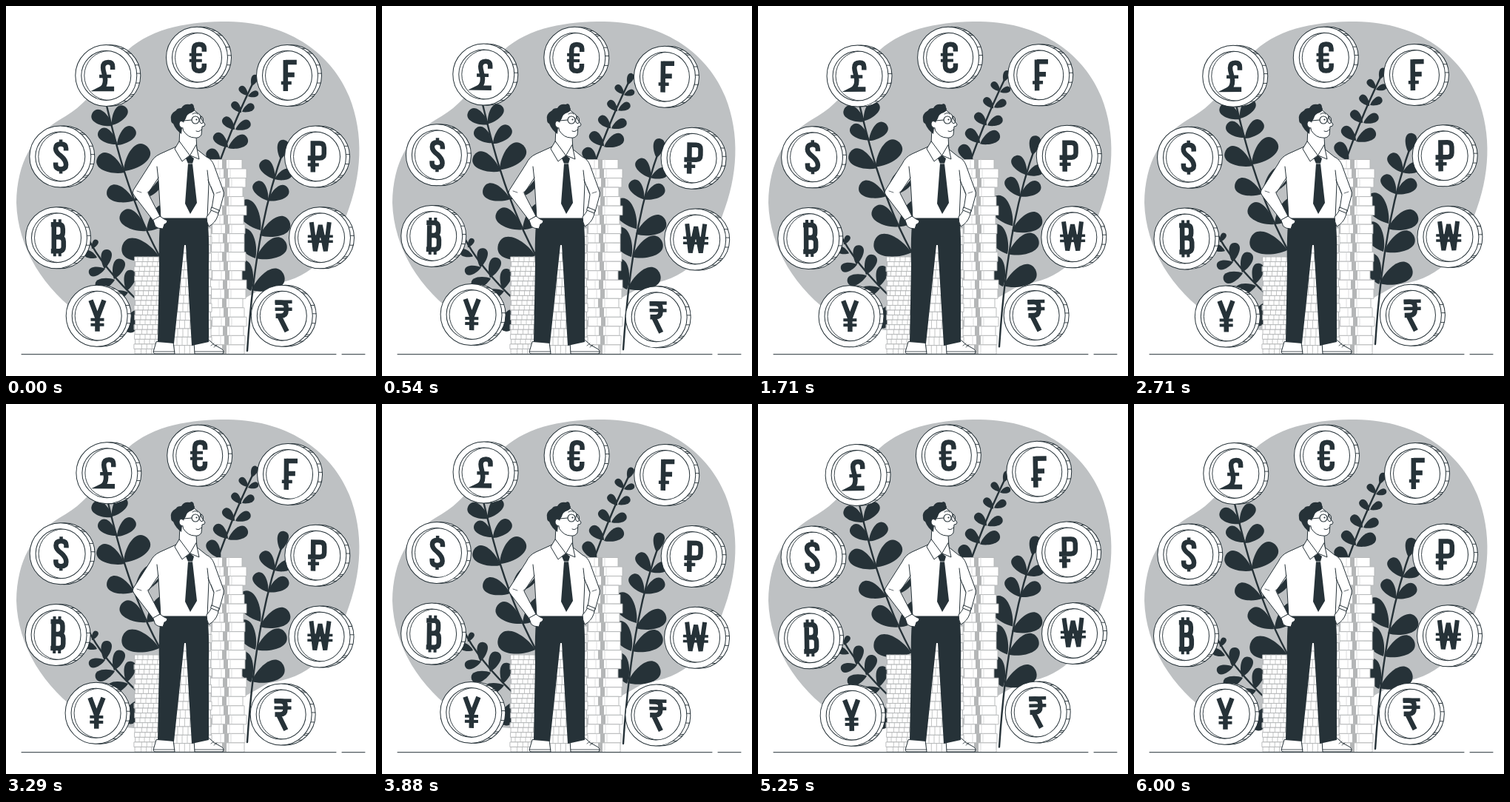
Animation, 500 px wide and 500 px high, one loop 6040 ms. Source, as an HTML page with a canvas:

```html
<!DOCTYPE html>
<html lang="en">
<head>
<meta charset="utf-8">
<title>Currencies</title>
<style>
html, body { margin: 0; width: 100%; height: 100%; overflow: hidden; background: #fff; }
canvas { display: block; width: 500px; height: 500px; }
</style>
</head>
<body>
<canvas id="stage"></canvas>
<script>
const INK = '#263238', GREY = '#bec1c3', PALE = '#b4b6b7';
const LOOP = 6040, SWING = 3000, RISE = 6000;
const canvas = document.getElementById('stage');
const ctx = canvas.getContext('2d');
const dpr = window.devicePixelRatio || 1;
canvas.width = canvas.height = 500 * dpr;

function shape(d, fill, line, width = 1) {
  const p = new Path2D(d);
  if (fill) { ctx.fillStyle = fill; ctx.fill(p); }
  if (line) { ctx.strokeStyle = line; ctx.lineWidth = width; ctx.stroke(p); }
}

function disc(x, y, r, fill, line, width = 1) {
  ctx.beginPath();
  ctx.arc(x, y, r, 0, Math.PI * 2);
  if (fill) { ctx.fillStyle = fill; ctx.fill(); }
  if (line) { ctx.strokeStyle = line; ctx.lineWidth = width; ctx.stroke(); }
}

function box(x, y, w, h) {
  ctx.fillStyle = '#fff';
  ctx.fillRect(x, y, w, h);
  ctx.strokeStyle = PALE;
  ctx.lineWidth = 0.9;
  ctx.strokeRect(x, y, w, h);
}

// Teardrop: pointed at the stem, round at the far end
function leaf(bx, by, tx, ty, fat) {
  const dx = tx - bx, dy = ty - by, nx = -dy * fat, ny = dx * fat;
  ctx.beginPath();
  ctx.moveTo(bx, by);
  for (const s of [1, -1]) {
    const a = [bx + dx * 0.28 + s * nx * 0.55, by + dy * 0.28 + s * ny * 0.55];
    const b = [bx + dx * 0.98 + s * nx, by + dy * 0.98 + s * ny];
    if (s > 0) ctx.bezierCurveTo(...a, ...b, tx, ty);
    else ctx.bezierCurveTo(...b, ...a, bx, by);
  }
  ctx.fillStyle = INK;
  ctx.fill();
}

const plants = [
  { stem: 'M133 122C141 156 149 190 160 224C172 262 190 308 214 350', fat: 0.48, leaves: [
    [144, 162, 117, 144], [143, 161, 161, 136], [150, 187, 126, 168], [150, 188, 173, 165],
    [160, 225, 124, 204], [159, 223, 191, 190], [173, 263, 137, 248], [174, 263, 206, 230],
    [189, 304, 156, 279], [190, 304, 222, 272], [207, 339, 157, 324]] },
  { stem: 'M338 95C322 128 304 166 280 235', fat: 0.48, leaves: [
    [332, 108, 338, 93], [327, 121, 316, 109], [327, 122, 341, 117], [318, 144, 306, 130],
    [319, 143, 335, 134], [309, 167, 294, 151], [310, 167, 330, 157], [300, 191, 282, 173],
    [300, 192, 326, 178], [290, 218, 274, 194]] },
  { stem: 'M376 192C354 252 335 330 326 466', fat: 0.48, leaves: [
    [371, 207, 376, 181], [363, 234, 346, 209], [363, 234, 386, 224], [354, 263, 337, 238],
    [354, 263, 381, 246], [344, 303, 317, 264], [343, 310, 383, 291], [337, 341, 315, 302],
    [338, 341, 378, 319], [331, 385, 315, 344], [332, 384, 375, 362]] },
  { stem: 'M110 312C124 342 150 372 183 403', fat: 0.46, leaves: [
    [116, 328, 123, 316], [123, 340, 106, 333], [133, 355, 137, 329], [134, 355, 112, 361],
    [146, 369, 156, 342], [147, 370, 121, 379], [163, 385, 170, 357], [165, 387, 137, 395],
    [180, 402, 191, 372], [182, 407, 163, 440]] }
];

function drawPlants(lift) {
  ctx.save();
  ctx.translate(0, -lift);
  for (const p of plants) {
    shape(p.stem, null, INK, 2.4);
    for (const l of p.leaves) leaf(...l, p.fat);
  }
  ctx.restore();
}

function stacks() {
  // tall stack
  const h = 12.52;
  for (let i = 0; i < 21; i++) {
    const x = 277 + (i * 7 % 5) - 2, y = 207.5 + i * h;
    const w = 322 + (i * 3 % 4) - (i % 3 ? 0 : 3) - x;
    box(x, y, w, h);
    ctx.fillStyle = PALE;
    ctx.fillRect(x + 17, y, 6, h);
    shape(`M${x + 26} ${y}v${h}M${x + 12} ${y}v${h}`, null, '#d2d4d5', 0.8);
  }
  // low stacks
  const low = (x0, y0, w, step) => {
    const rows = Math.round((470 - y0) / step), rh = (470 - y0) / rows;
    for (let i = 0; i < rows; i++) {
      const x = x0 + [0, 1, -0.7, 0.5][i % 4], y = y0 + i * rh;
      box(x, y, w, rh);
      let d = '';
      for (let k = 4 + i * 5 % 7; k < w; k += 7) d += `M${x + k} ${y}v${rh}`;
      shape(d, null, PALE, 0.8);
    }
  };
  low(224, 300, 53, 11);
  low(174, 339, 42, 6.6);
}

function man() {
  ctx.lineJoin = ctx.lineCap = 'round';
  // shoes
  shape('M203 454L200 464Q198 470 202 470H228L226 454Z', '#fff', INK);
  shape('M199 467H228', null, INK, 0.8);
  shape('M254 454L255 470H293Q296 465 289 462Q281 459 275 452Z', '#fff', INK);
  shape('M255 467H294M277 459l4 -3M281 461l4 -3', null, INK, 0.8);
  // trousers
  shape('M209 286H272Q275 310 274 350L274 454L251 459L243 323H241L227 456L205 454L207 350Q206 310 209 286Z', INK);
  // shirt and arms
  shape('M230 190L208 200Q199 204 195 213L172 249Q170 252 173 256L199 290L208 284L192 252L206 235L209 287H272L273 284L281 276L288 279L294 256Q295 252 293 248L281 215Q278 207 271 204L256 192Z', '#fff');
  shape('M230 190L208 200Q199 204 195 213L172 249Q170 252 173 256L199 290L208 284L192 253L206 232M204 217Q206 232 207 252L209 287H272L274 240L272 222', null, INK);
  shape('M256 192L271 204Q278 207 281 215L293 248Q295 252 294 256L288 278L278 274L281 255L273 235', null, INK);
  shape('M191 252l9 -7M177 250l6 2M281 254l-4 -10M290 251l-6 2', null, INK, 0.7);
  // hands
  shape('M199 289L208 284Q213 288 218 290Q218 294 214 295L212 301Q205 301 202 298Z', '#fff', INK);
  shape('M287 278L278 275Q275 281 271 285Q271 292 274 298Q283 293 286 284Z', '#fff', INK);
  shape('M278 272L288 276L287 280L277 276Z', '#fff', INK);
  // neck and face
  shape('M235 163L234 187L248 203L258 194L257 177L249 160Z', '#fff', INK);
  shape('M236 154Q238 143 253 140L262 147L264 153L269 160Q269 163 265 163L264 174Q261 179 255 178Q246 178 240 169Z', '#fff', INK);
  shape('M223 154Q221 146 230 141Q231 138 237 138Q240 132 248 133L251 132Q254 133 254 137Q257 141 251 144Q244 146 243 152L240 157Q237 154 235 158Q234 162 238 164L237 173Q229 167 226 159Q223 158 223 154Z', INK);
  shape('M240 157Q235 153 234 159Q234 164 239 165', '#fff', INK, 0.9);
  shape('M257 169Q261 171 264 167M252 146Q256 143 259 146', null, INK);
  disc(256, 154, 5, null, INK, 1.1);
  shape('M264 149Q268 151 266 158Q264 160 262 157Q261 151 264 149M251 154L240 155', null, INK);
  disc(257.5, 153.5, 1.1, INK);
  // collar and tie
  shape('M234 183L228 193L238 210L248 202Z', '#fff', INK);
  shape('M257 188L261 207L249 202Z', '#fff', INK);
  shape('M243 206L249 202L254 206L252 213L258 266L249 281L242 267L246 213Z', INK);
  shape('M246 213h6', null, '#fff', 0.7);
}

// Each glyph: [path, stroke width] pairs around the coin centre
const glyphs = {
  pound: [['M8 -8V-12Q8 -18 2 -18Q-5 -18 -5 -11C-5 -5 -2 -1 -2 6C-2 12 -4 16 -8 18H10', 6.5], ['M-10 1H6', 4.5]],
  euro: [['M9 -8V-12Q9 -18 2 -18Q-5 -18 -5 -11V11Q-5 18 2 18Q9 18 9 12V8', 6.5], ['M-11 -4H6M-11 4H6', 4]],
  franc: [['M-3 21V-21M-3 -18H12M-3 -1H9', 6.5], ['M-9 10H5', 4.5]],
  ruble: [['M-4 21V-18H5Q11 -18 11 -12V-4Q11 2 5 2H-11', 6.5], ['M-11 11H4', 4.5]],
  won: [['M-12 -21L-7 18L0 -17L7 18L12 -21', 6], ['M-17 -2H17M-17 5H17', 3.5]],
  rupee: [['M-10 -18H-2Q5 -18 5 -12V-7Q5 0 -2 0H-9M-4 1L6 21', 6.5], ['M-10 -19H13M-10 -9H13', 4.5]],
  yen: [['M-9 -21L0 3L9 -21M0 0V21', 6.5], ['M-9 5H9M-9 12H9', 4]],
  baht: [['M-4 -18V18H3Q9 18 9 12V5Q9 -1 3 -1H-4M3 -1Q8 -2 8 -7V-12Q8 -18 3 -18H-8M-4 18H-8', 6.5], ['M-3 -25V-18M4 -25V-18M-3 18V25M4 18V25', 4]],
  dollar: [['M7 -8V-11Q7 -17 0 -17Q-7 -17 -7 -11Q-7 -6 0 -1Q7 5 7 11Q7 17 0 17Q-7 17 -7 11V8', 6.5], ['M0 -23V-17M0 17V23', 4.5]]
};

const coins = [
  ['pound', 135.3, 94], ['euro', 258, 69.7], ['franc', 380, 94],
  ['ruble', 418, 203.5], ['won', 424, 313.2], ['rupee', 372.8, 418.7],
  ['yen', 122.7, 418.7], ['baht', 68, 313.2], ['dollar', 73.3, 203.5]
];

function coin(name, x, y) {
  ctx.save();
  ctx.translate(x, y);
  disc(5, 0, 41.5, '#fff', INK);
  for (const a of [-62, -50, -46, -20, -4, 14, 38, 42, 56]) {
    const r = a * Math.PI / 180, c = Math.cos(r) * 41.5, s = Math.sin(r) * 41.5;
    shape(`M${c} ${s}h5`, null, INK, 0.9);
  }
  disc(0, 0, 41.5, '#fff', INK);
  disc(0, 0, 33.5, '#fff', INK);
  ctx.save();
  ctx.beginPath();
  ctx.arc(0, 0, 33.5, 0, 7);
  ctx.clip();
  disc(4, 0, 33.5, null, INK, 0.9);
  ctx.restore();
  ctx.lineCap = 'butt';
  ctx.lineJoin = name === 'won' || name === 'yen' ? 'bevel' : 'miter';
  ctx.translate(0.8, 0);
  for (const [d, w] of glyphs[name]) shape(d, null, INK, w);
  ctx.restore();
}

// Linear sway: 0, +1, -1, 0 at 0, 25, 75 and 100 %
function sway(p) {
  return p < 0.25 ? p * 4 : p < 0.75 ? 2 - p * 4 : p * 4 - 4;
}

function draw(t) {
  ctx.setTransform(dpr, 0, 0, dpr, 0, 0);
  ctx.fillStyle = '#fff';
  ctx.fillRect(0, 0, 500, 500);
  shape('M72 154C122 127 127 93 164 60C199 28 251 21 300 21C386 22 442 68 464 123C484 174 481 229 460 283C439 342 408 370 355 377C323 394 282 421 236 432C190 442 143 441 105 420C51 384 16 327 14 266C15 211 36 176 72 154Z', GREY);

  const rise = Math.min(t, RISE) / RISE;
  drawPlants(10 * (1 - Math.abs(rise * 2 - 1)));
  stacks();
  shape('M21 470.7H446M454 470.7H485', null, INK, 1);
  man();

  ctx.save();
  ctx.translate(248, 250);
  ctx.rotate(sway(t % SWING / SWING) * Math.PI / 180);
  ctx.translate(-248, -250);
  for (const c of coins) coin(...c);
  ctx.restore();
}

const start = performance.now();
function tick() {
  draw((performance.now() - start) % LOOP);
  requestAnimationFrame(tick);
}
tick();
</script>
</body>
</html>
```
